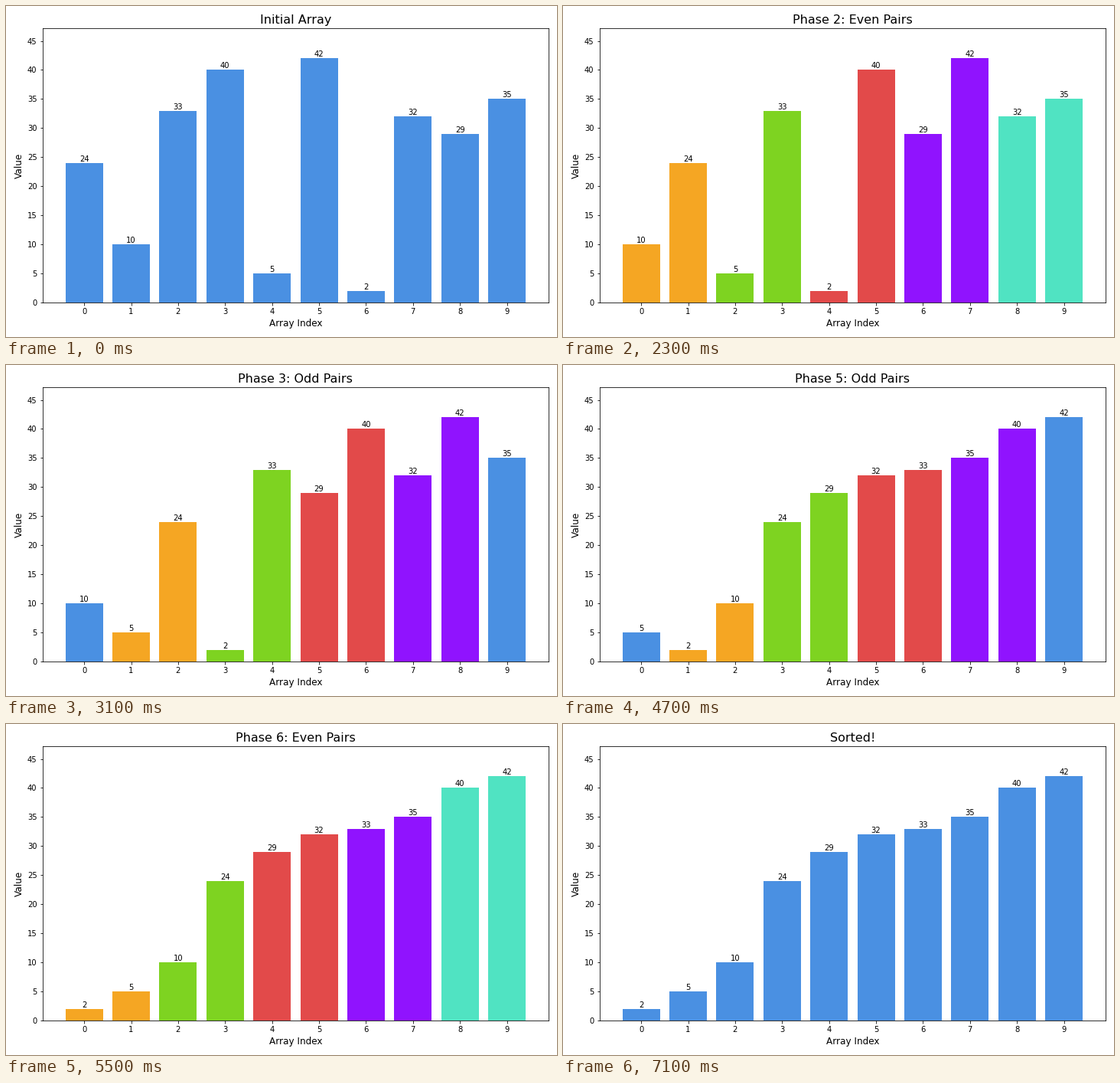
These frames come from a looping animation (720x432 px, 9100 ms). A matplotlib script:

```python
import matplotlib.pyplot as plt
from matplotlib.animation import FuncAnimation

VALUES = [24, 10, 33, 40, 5, 42, 2, 32, 29, 35]
BASE = "#4A90E2"
PAIR_COLORS = ["#F5A623", "#7ED321", "#E24A4A", "#9013FE", "#50E3C2"]
PHASES = 7
TICK, START, HOLD, LOOP = 100, 1500, 800, 9100

plt.rcParams["font.family"] = "DejaVu Sans"


def sort_states(values):
    """Odd-even transposition sort: one (title, values, colors) per phase."""
    arr = list(values)
    plain = [BASE] * len(arr)
    states = [("Initial Array", arr[:], plain)]
    for phase in range(1, PHASES + 1):
        colors = plain[:]
        for k, i in enumerate(range(phase % 2, len(arr) - 1, 2)):
            arr[i:i + 2] = sorted(arr[i:i + 2])
            colors[i] = colors[i + 1] = PAIR_COLORS[k]
        kind = "Odd" if phase % 2 else "Even"
        states.append((f"Phase {phase}: {kind} Pairs", arr[:], colors))
    states.append(("Sorted!", arr[:], plain))
    return states


STATES = sort_states(VALUES)

fig, ax = plt.subplots(figsize=(10, 6), dpi=72)
bars = ax.bar(range(len(VALUES)), VALUES, color=BASE)
labels = [ax.text(i, v, str(v), ha="center", va="bottom", fontsize=10)
          for i, v in enumerate(VALUES)]
title = ax.set_title(STATES[0][0], fontsize=16)
ax.set_xlabel("Array Index", fontsize=12)
ax.set_ylabel("Value", fontsize=12)
ax.set_xticks(range(len(VALUES)))
ax.set_yticks(range(0, 50, 5))
ax.set_ylim(0, 47.2)
fig.tight_layout()


def update(frame):
    t = frame * TICK
    step = 0 if t < START else min((t - START) // HOLD + 1, PHASES + 1)
    text, values, colors = STATES[step]
    title.set_text(text)
    for bar, label, v, color in zip(bars, labels, values, colors):
        bar.set_height(v)
        bar.set_facecolor(color)
        label.set_y(v)
        label.set_text(str(v))
    return [title, *bars, *labels]


anim = FuncAnimation(fig, update, frames=LOOP // TICK, interval=TICK,
                     repeat=True, repeat_delay=0, blit=False)
plt.show()
```
